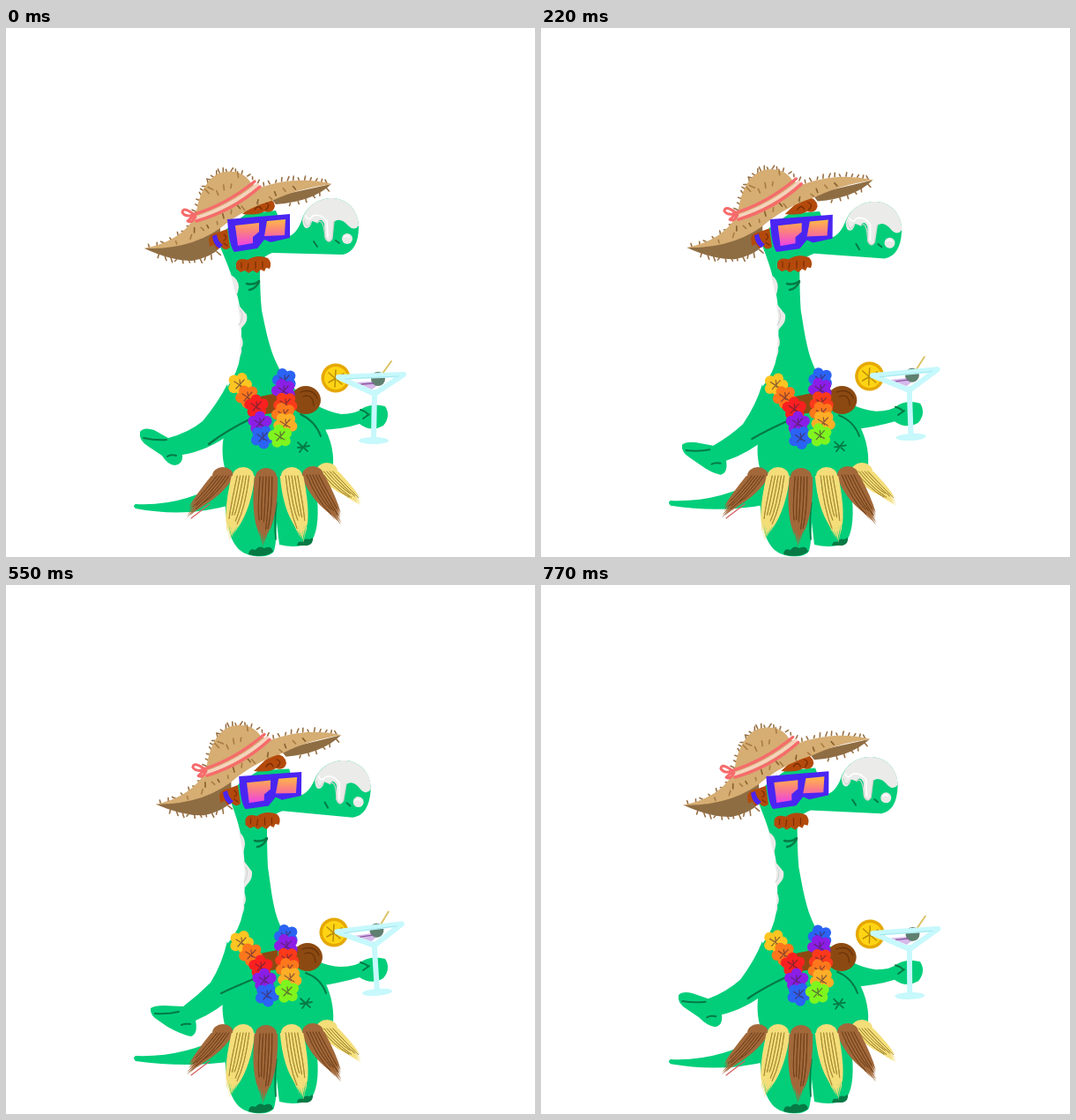
An HTML page with a canvas for the animation above (0.88 s loop, 600x600 px).

```html
<!DOCTYPE html>
<html lang="en">
<head>
<meta charset="utf-8">
<title>Beach dinosaur</title>
<style>
  html, body { margin: 0; width: 100%; height: 100%; overflow: hidden; background: #fff; }
  canvas { display: block; }
</style>
</head>
<body>
<canvas id="stage" width="600" height="600"></canvas>
<script>
const ctx = document.getElementById('stage').getContext('2d');
const GREEN = '#02ce7a', DARK = '#057a45', STRAW = '#d6ad72', SHADE = '#8f6d43',
      HAIR = '#b34a0c', HAIR_LINE = '#7b2e05', BLUE = '#4a25f2', CREAM = '#ebebea', GLASS = '#c6f8fc';
const FRAME_MS = 110;
let sway = 0; // 0 = leaning left, 4/3 = leaning right

const noise = n => { const v = Math.sin(n * 127.1 + 3) * 43758.5453; return v - Math.floor(v); };

// In path strings "a~d" means a + d * sway.
const path = d => new Path2D(d.replace(/(-?[\d.]+)~(-?[\d.]+)/g, (_, a, s) => +a + s * sway));
const fill = (color, d) => { ctx.fillStyle = color; ctx.fill(path(d)); };
const line = (color, width, d) => {
  ctx.strokeStyle = color;
  ctx.lineWidth = width;
  ctx.stroke(path(d));
};
const disc = (color, x, y, rx, ry = rx) => {
  ctx.fillStyle = color;
  ctx.beginPath();
  ctx.ellipse(x, y, rx, ry, 0, 0, 7);
  ctx.fill();
};
function group(dx, dy, degrees, cx, cy, draw) {
  ctx.save();
  ctx.translate(cx + dx * sway, cy + dy * sway);
  ctx.rotate(degrees * sway * Math.PI / 180);
  ctx.translate(-cx, -cy);
  draw();
  ctx.restore();
}

// Short straw strokes scattered along a quadratic curve.
function straws(color, count, length, x0, y0, x1, y1, x2, y2, spread = 0) {
  for (let i = 0; i < count; i++) {
    const t = (i + .5) / count, u = 1 - t;
    const x = u * u * x0 + 2 * u * t * x1 + t * t * x2;
    const y = u * u * y0 + 2 * u * t * y1 + t * t * y2 + (noise(i + x0) - .5) * spread;
    const slope = Math.atan2(u * (y1 - y0) + t * (y2 - y1), u * (x1 - x0) + t * (x2 - x1));
    const angle = slope - Math.PI / 2 + (noise(i * 3 + y0) - .5) * 1.5;
    const len = length * (.6 + .6 * noise(i + y1));
    line(color, 1.6, `M${x} ${y}l${len * Math.cos(angle)} ${len * Math.sin(angle)}`);
  }
}

// A rounded knot whose strands hang down first, then bend towards the tip.
function tassel(x, y, tipX, tipY, color, shade) {
  const dx = tipX - x, dy = tipY - y;
  disc(color, x, y + 5, 12, 10);
  const strand = (side, reach, half) => {
    const midX = x + side * 1.25 + dx * .38, midY = y + dy * .52;
    const endX = x + dx * reach + side * .75, endY = y + dy * reach;
    return `M${x + side - half} ${y + 5}Q${midX - half} ${midY} ${endX} ${endY}Q${midX + half} ${midY} ${x + side + half} ${y + 5}Z`;
  };
  for (let i = -4; i <= 4; i++) fill(color, strand(i * 2.3, 1 - Math.abs(i) * .06 + .06 * noise(i + x), 4));
  for (let i = -2; i <= 2; i++) line(shade, .9, strand(i * 3.4, .62 + .25 * noise(i + x), 0));
}

function flower(color, x, y, dx, dy) {
  const cx = x + dx * sway, cy = y + dy * sway, turn = noise(x);
  disc(color, cx, cy, 10);
  for (let i = 0; i < 5; i++) {
    const a = turn + i * Math.PI * .4;
    disc(color, cx + 8 * Math.cos(a), cy + 7.5 * Math.sin(a), 6);
  }
  line('rgba(70,35,60,.6)', 1.3,
    `M${cx - 6} ${cy - 3}L${cx + 5} ${cy + 4}M${cx + 5} ${cy - 5}L${cx - 4} ${cy + 5}M${cx} ${cy - 5}L${cx + 1} ${cy + 3}`);
}

function body() {
  fill(GREEN, 'M147 540~-6Q202 543~-7 250 512~-2L258 540Q205 556~-8 147 545~-5Q143 542~-6 147 540~-6Z');
  // legs and belly
  fill(GREEN, 'M250 505C246 545 250 574 262 589C272 602 300 602 304 593C309 577 305 550 310 530L300 500Z');
  fill(GREEN, 'M300 500L310 586Q330 591 345 584Q356 570 353 535L350 500Z');
  fill(DARK, 'M275 597Q276 589 283 592Q287 586 293 590Q301 586 303 594Q292 602 275 597Z');
  fill(DARK, 'M330 587Q331 581 336 583Q339 578 344 580L348 578Q349 585 342 587Z');
  line(DARK, 1.6, 'M307 538Q304 562 306 580');
  fill(GREEN, 'M250 505C243 485 245 462 252 448Q268 425 309 427Q350 428 362~2 455C372 474 373 494 369 507Q310 525 250 505Z');
  // neck and shoulders
  fill(GREEN, `M242~13 246C252~12 270 260~9 288 266~5 320Q268~3 350 266~3 370Q263~2 392 251 407
    L251 455L350 450Q346 424 326 408C304 385 298~5 360 290~7 320Q288~8 300 288~8 275L292~10 245Z`);
  // left arm and hand
  fill(GREEN, `M251 404Q241~4 424~6 223~9 446~5Q207~10 459~7 184~17 465~13L168~11 456~21Q156~12 452~25 152~12 458~22
    Q150~13 468~20 162~11 475~19L177~6 485~16Q183~16 495~15 191~19 496~16
    Q201~17 495~14 200~15 484~10Q228~11 480~4 258~5 458~4Z`);
  line(DARK, 2, 'M156~13 465~21Q170~13 468~19 182~14 467~17M183~16 486~13Q187~16 483~14 193~16 485~13');
  line(DARK, 2.3, 'M230~14 472~-9Q249~12 457~-2 278~5 443~3');
  // right arm and hand
  fill(GREEN, `M325 408Q352 433~-1 380 438~-5Q397 438~-5 405 431~-5Q416 425~-5 430 429~-5
    Q437 440~-5 428 451~-5Q414 459~-5 401 449~-4Q380 456~-5 350 456L320 440Z`);
  line(DARK, 2, 'M334~6 438~2Q351~6 446 357~6 463M402 433~-5Q409 435~-5 411 439~-6M405 443~-6L412 438~-6');
  line(DARK, 1.8, 'M331~3 470~-1L342~3 480~-1M341~3 470~-1L333~3 481~-1M331~3 476~-1L344~3 474~-1');
  // pale neck patches
  fill(CREAM, 'M255~9 280Q264~7 285 264~7 294Q263~7 301 261~8 304Z');
  fill(CREAM, 'M262~7 312Q266~7 317 273~6 325Q275~5 332 269~6 338Q264~6 343 265~5 347L265~6 326Z');
  fill(CREAM, 'M266~4 348Q271~3 357 267~3 363Q268~3 368 265~3 373Z');
  line('#d2d5d3', 1.2, 'M266~6 320Q271~5 328 264~6 337');
  line(DARK, 2.4, 'M273~9 290Q281~9 292 287~9 287M276~9 297Q283~9 296 287~9 288');
}

function skirt() {
  const brown = '#a2683a', yellow = '#f4de79', brownShade = '#71421c', yellowShade = '#a58a35';
  line('#d65d5d', 1.2, 'M231 540L210 556');
  tassel(364, 498, 402, 541, yellow, yellowShade);
  tassel(246, 503, 206, 554, brown, brownShade);
  tassel(348, 502, 379, 562, brown, brownShade);
  tassel(269, 503, 253, 582, yellow, yellowShade);
  tassel(324, 503, 338, 584, yellow, yellowShade);
  tassel(295, 504, 291, 588, brown, brownShade);
}

function lei() {
  disc('#8c4a12', 340 + 2 * sway, 422, 17, 16);
  line('#6a330a', 1.3, 'M334~2 413Q348~2 408 353~2 420M337~2 418Q348~2 414 349~2 428');
  fill('#8c4a12', 'M288 418L308 414L309 436L294 438Z');
  [['#fdc522', 265, 404, 2, 1], ['#fd781c', 274, 418, 4, 1], ['#fb2020', 284, 429, 5, 4],
   ['#8b1ee6', 288, 448, 5, 0], ['#2b63f4', 291, 464, 5, 1],
   ['#2b63f4', 316, 399, 2, -1], ['#8b1ee6', 315, 411, 3, -2], ['#fb3a1b', 317, 426, 2, -2],
   ['#fd781c', 315, 438, 5, -2], ['#fdae27', 317, 449, 5, -3], ['#7ff51f', 311, 463, 8, -2]
  ].forEach(f => flower(...f));
}

function drink() {
  group(-2, -3, 0, 0, 0, () => {
    disc('#e5a800', 374, 397, 16.5);
    disc('#ffd414', 374, 397, 13);
    line('#b98d08', 1.5, 'M366 391L381 404M374 388L373 407M383 392L366 402');
  });
  group(1, -6, -4.6, 417, 430, () => {
    line('#dcc367', 2, 'M424 396L437 378');
    fill('#d5b9ea', 'M397 402L429 400L415 410Z');
    disc('#5f8071', 422, 398, 8);
    line('#8b58a0', 1.3, 'M403 404L417 403');
    line(GLASS, 6, 'M377 396L451 393L418 415L379 397M418 413L417 466');
    line('#a5e7f0', 1, 'M385 398L445 395');
    disc(GLASS, 417, 468, 17, 4);
  });
}

function head() {
  group(13, 0, 4, 285, 238, () => {
    fill(GREEN, `M244 245L250 228L272 211L306 207L318 237Q329 235 335 219C341 200 356 193 370 193
      C390 194 400 210 400 225Q400 253 382 257L302 255Q285 262 284 276L255 272Z`);
    fill(CREAM, `M336 218C341 200 356 193 370 193C390 194 400 210 400 224Q395 231 388 224Q379 214 372 220
      L370 239Q366 246 362 238L361 222Q357 214 353 221L347 219Q345 228 340 227Q337 226 336 218Z`);
    disc(CREAM, 387, 239, 6);
    line('#fff', 1.6, 'M340 213Q343 220 348 213Q357 210 364 219L365 237M384 237Q386 234 389 237');
    line('#cfd3d1', 1.2, 'M338 218Q341 230 346 220M353 221Q360 214 362 238Q366 246 370 239L372 219');
    line(DARK, 2, 'M349 242L353 248M374 241L378 244');
  });
  // hair under the brim
  group(13, 0, 0, 0, 0, () => {
    fill(HAIR, 'M268 211L288 192Q303 190 305 202Q303 211 293 208Q286 213 268 211Z');
    line(HAIR_LINE, 1.3, 'M282 206Q287 199 290 206M294 198Q301 200 295 206');
  });
  group(10.5, -1, 0, 0, 0, () => {
    fill(HAIR, 'M261 267Q263 260 274 263Q285 256 297 261Q302 266 299 273L295 272L293 276L289 274L285 278L280 275L275 278L271 275L266 277L261 273Z');
    line(HAIR_LINE, 1.2, 'M267 266L267 272M275 267L274 274M283 265L283 273M291 265L291 272');
  });
}

function glasses() {
  group(12, -1, 0, 0, 0, () => {
    fill(HAIR, 'M230 239Q232 233 240 232L251 228L254 249Q248 254 244 248L239 251L236 246L231 248Z');
    fill(BLUE, 'M234 236L239 234Q240 242 246 246L242 250Q235 246 234 236Z');
    line(HAIR_LINE, 1.2, 'M247 234Q252 238 247 241M247 244L251 247');
  });
  group(13, .5, .7, 285, 230, () => {
    fill(BLUE, 'M251 217L322 211L322 238L300 243L293 240L285 250L259 254Q253 248 251 217Z');
    const lens = ctx.createLinearGradient(0, 218, 0, 246);
    lens.addColorStop(0, '#ffb64a');
    lens.addColorStop(.45, '#fb7f80');
    lens.addColorStop(1, '#ee46e0');
    ctx.fillStyle = lens;
    ctx.fill(path('M260 224L287 221L287 231L280 237L280 244L263 247ZM296 219L317 217L316 235L293 236Z'));
  });
}

function hat() {
  group(12, -4, -1.5, 262, 215, () => {
    const fringe = '#987044';
    straws(fringe, 14, 4.5, 215, 212, 225, 160, 257, 163);
    straws(fringe, 5, 4, 257, 163, 275, 165, 288, 179);
    straws(fringe, 12, 4, 289, 180, 330, 166, 367, 177);
    straws(fringe, 6, 4, 367, 179, 345, 193, 318, 200);
    straws(fringe, 11, 5, 242, 252, 208, 272, 170, 255);
    straws(fringe, 7, 4, 158, 250, 190, 245, 213, 222);
    fill(SHADE, 'M157 250Q200 249 243 226L243 249Q233 260 211 264Q187 264 157 250Z');
    fill(SHADE, 'M369 177Q348 197 306 200L300 192Z');
    fill(STRAW, `M156 250Q191 244 209 222L216 208C219 189 229 165 249 163Q269 161 278 176L288 181Q329 167 370 177
      Q331 182 304 195Q276 203 252 220Q215 252 156 250Z`);
    straws('#a77c45', 9, 5, 186, 246, 255, 216, 325, 178, 8);
    straws('#85602f', 7, 5, 206, 239, 258, 205, 340, 178, 7);
    straws('#a77c45', 6, 6, 228, 195, 240, 177, 268, 174, 14);
    line('#f5d3bd', 4, 'M214 216Q253 204 285 178');
    line('#f66b6b', 3.5, 'M211 212Q249 201 282 174');
    line('#f66b6b', 3.5, 'M216 219Q258 207 288 180');
    line('#f66b6b', 3, 'M214 212Q201 202 200 209Q203 215 214 212L206 219Q211 222 215 214');
  });
}

function draw(now) {
  const step = Math.floor(now / FRAME_MS) % 8;
  sway = (4 - Math.abs(4 - step)) / 3;
  ctx.fillStyle = '#fff';
  ctx.fillRect(0, 0, 600, 600);
  ctx.lineCap = ctx.lineJoin = 'round';
  [body, skirt, lei, drink, head, hat, glasses].forEach(part => part());
}

const start = performance.now();
function tick() {
  draw(performance.now() - start);
  requestAnimationFrame(tick);
}
tick();
</script>
</body>
</html>
```
